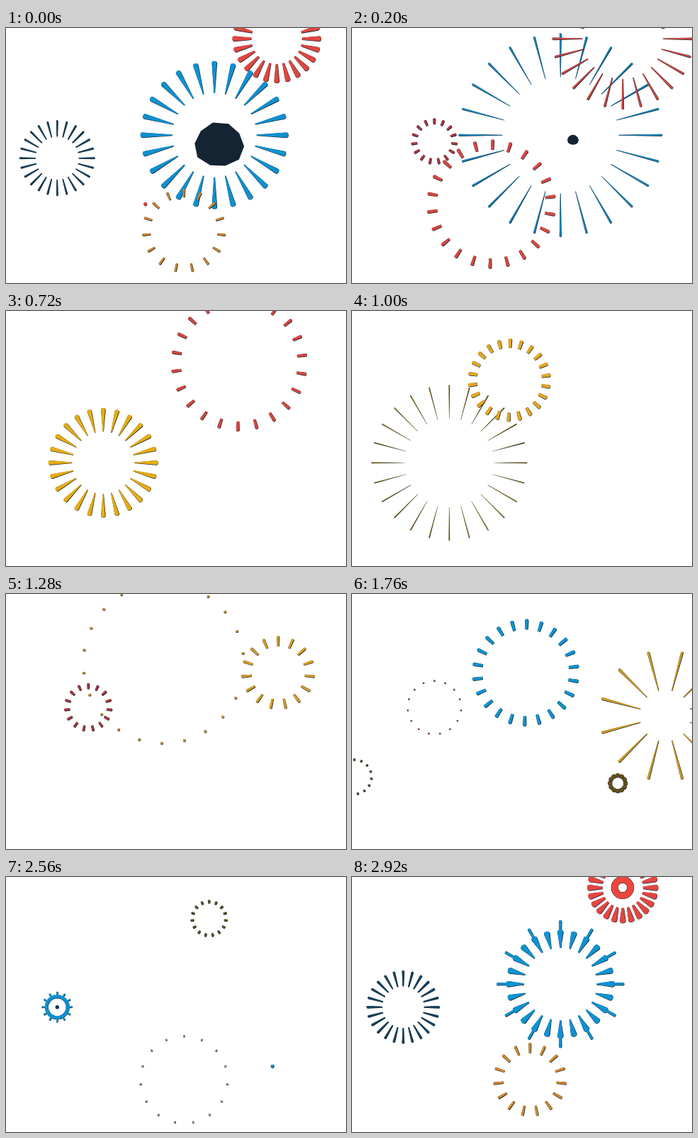
Write an HTML page with a canvas that moves like this. It is 480 px wide and 360 px high and loops after 2.96 s.

```html
<!DOCTYPE html>
<html lang="en">
<head>
<meta charset="utf-8">
<title>Fireworks</title>
<style>
  html, body { margin: 0; width: 100%; height: 100%; overflow: hidden; background: #fff; }
  canvas { display: block; }
</style>
</head>
<body>
<canvas id="stage" width="480" height="360"></canvas>
<script>
const ctx = document.getElementById('stage').getContext('2d');
const LOOP = 2960, STEP = 40, TAU = Math.PI * 2;

const BLUE = [10, 154, 224], NAVY = [12, 66, 100], RED = [240, 70, 62], WINE = [186, 52, 60];
const YELLOW = [255, 186, 8], GOLD = [244, 174, 28], AMBER = [240, 148, 40];
const BROWN = [178, 86, 78], TAN = [214, 194, 146], DARK = [104, 80, 28];
const SHADE = '#14222e', FADED = [60, 74, 84];

const mix = (a, b, k) => a + (b - a) * k;
const easeOut = (p, power) => 1 - Math.pow(1 - p, power);
const reach = p => easeOut(p, 2.8);

// Each kind: ray count, life in ms, ray width and how fast it thins,
// and the inner radius as a share of the size at progress p
const SHELL = { n: 24, life: 600, width: 11, thin: 1.5, taper: .2, rot: 0, inner: p => .57 * reach(p) };
const RING = { n: 22, life: 500, width: 5.2, thin: .4, taper: .8, rot: 1.2, inner: p => easeOut(p, 2) };
const SPARK = { n: 15, life: 285, width: 4.2, thin: .4, taper: .8, rot: 0, inner: p => easeOut(p, 1.5) };
const LONG = { ...SHELL, n: 12, width: 13, taper: .3, rot: 15, inner: p => .39 * reach(p) };
const POP = { ...SHELL, life: 300, taper: .6 };

const burst = (kind, t0, x, y, size, color, extra) => ({ ...kind, t0, x, y, size, color, ...extra });

const bursts = [
  burst(SHELL, 2752, 294, 151, 150, BLUE, { width: 13, tip: .09 }),
  burst(SHELL, 2560, 72, 183.5, 56, NAVY, { taper: .5 }),
  burst(SHELL, 2800, 382, 15, 108, RED, { taper: .4 }),
  burst(SHELL, 512, 137, 214, 111, YELLOW),
  burst(LONG, 1400, 442, 171.5, 101, GOLD),
  burst(POP, 2500, 72, 183.5, 47, BLUE, { tip: .09 }),
  burst(POP, 1700, 375, 267, 30, DARK, { n: 12 }),
  burst(POP, 2560, 376, 267, 30, BLUE, { n: 12 }),
  burst(RING, 0, 196.5, 248.5, 120, RED),
  burst(RING, 500, 329, 73.5, 120, RED),
  burst(RING, 890, 222, 97.5, 117, GOLD),
  burst(RING, 1610, 245, 111, 120, BLUE),
  burst(SPARK, 69, 116, 160, 40, WINE),
  burst(SPARK, 1137, 116, 160, 40, WINE),
  burst(SPARK, 1518, 116, 160, 39, BROWN),
  burst(SPARK, 1155, 384, 111, 65, GOLD),
  burst(SPARK, 1560, 3, 258, 27, DARK),
  burst(SPARK, 2389, 286.5, 58.5, 28.5, DARK),
  burst(SPARK, 2318, 251, 286, 63.5, TAN),
  burst(SPARK, 2795, 251, 286, 65, AMBER)
];

function drop(r0, r1, w, taper) {
  const h = w / 2, end = Math.max(r0, r1 - h * .8);
  ctx.beginPath();
  ctx.moveTo(r0, -h * taper);
  ctx.lineTo(end, -h);
  ctx.quadraticCurveTo(r1, -h, r1, 0);
  ctx.quadraticCurveTo(r1, h, end, h);
  ctx.lineTo(r0, h * taper);
  ctx.fill();
}

function drawBurst(b, age) {
  const p = age / b.life;
  const outer = Math.max(2.5, b.size * reach(p));
  const inner = b.size * b.inner(p);
  const room = .8 * TAU * outer / b.n;
  const width = Math.min(room, b.width * Math.pow(1 - p, b.thin));
  const tip = b.tip && p < .3 ? b.tip * b.size : 0;
  const tint = b.color.map((v, i) => Math.round(mix(v, FADED[i], .35 * p)));

  // A slightly wider dark copy leaves a thin edge on one side
  for (const [fill, edge] of [[SHADE, .8], [`rgb(${tint})`, 0]]) {
    ctx.fillStyle = fill;
    for (let i = 0; i < b.n; i++) {
      ctx.save();
      ctx.translate(b.x + edge / 2, b.y + edge / 2);
      ctx.rotate((i / b.n - .25) * TAU + b.rot * TAU / 360);
      drop(inner, outer - tip, width + edge, b.taper);
      if (tip && i % 2 === 0) drop(inner, outer, width * .45 + edge, .6);
      ctx.restore();
    }
  }
}

// Red ring that opens just before the loop restarts
function drawCore(t) {
  if (t < 2840) return;
  const r = mix(6, 11.3, (t - 2840) / 80);
  for (const [color, width] of [[SHADE, 10], ['#ec463e', 9]]) {
    ctx.strokeStyle = color;
    ctx.lineWidth = width;
    ctx.beginPath();
    ctx.arc(382, 15, r, 0, TAU);
    ctx.stroke();
  }
}

// Dark lump that shrinks away
function drawRock(t) {
  if (t >= 240) return;
  const k = t / 200, s = mix(1, .23, k);
  const x = mix(301, 312, k), y = mix(165, 158, k);
  ctx.fillStyle = '#142433';
  ctx.beginPath();
  for (let i = 0; i < 10; i++) {
    const a = (i + .1) * TAU / 10;
    const wobble = 1 + .04 * Math.sin(3 * a);
    ctx.lineTo(x + 35 * s * wobble * Math.cos(a), y + 31.5 * s * wobble * Math.sin(a));
  }
  ctx.fill();
}

function frame(now) {
  const t = Math.floor((now % LOOP) / STEP) * STEP;
  ctx.fillStyle = '#fff';
  ctx.fillRect(0, 0, 480, 360);
  for (const b of bursts) {
    const age = (t - b.t0 + LOOP) % LOOP;
    if (age < b.life) drawBurst(b, age);
  }
  drawCore(t);
  drawRock(t);
}

const start = performance.now();
function tick() {
  frame(performance.now() - start);
  requestAnimationFrame(tick);
}
tick();
</script>
</body>
</html>
```
